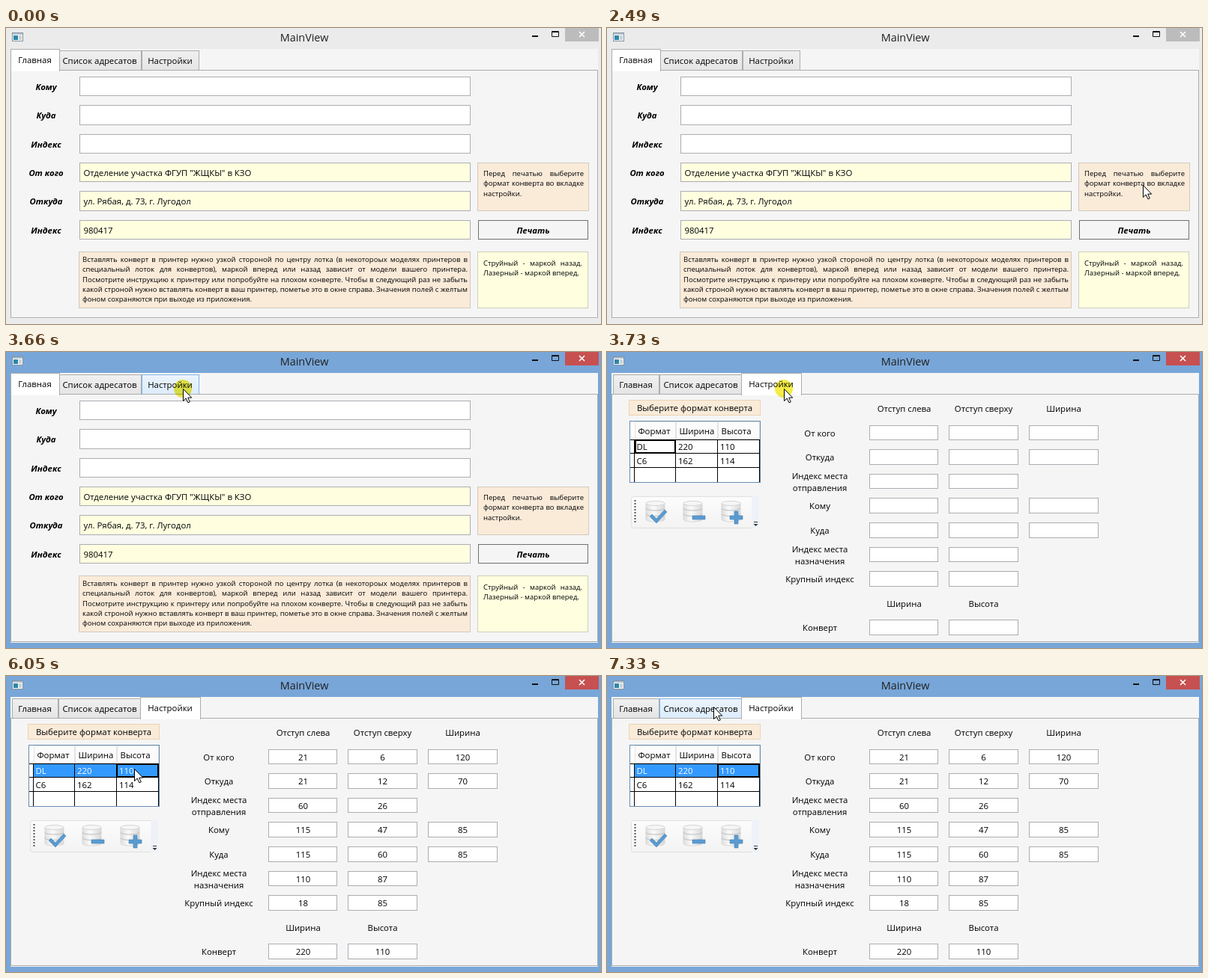
These frames come from a looping animation (794 by 396 pixels, 8 s). An HTML page:

```html
<!DOCTYPE html>
<html lang="ru">
<head>
<meta charset="utf-8">
<style>
html, body { margin: 0; width: 100%; height: 100%; overflow: hidden; }
svg { display: block; width: 794px; height: 396px; }
text { font: 11.4px "Open Sans", "Noto Sans", sans-serif; fill: #000; }
.title { font-size: 14.4px; fill: #222; }
.label { font-weight: 700; font-style: italic; font-size: 11.3px; }
.small { font-size: 9.5px; }
.mid { text-anchor: middle; }
.bar { fill: #ebebeb; }
.close { fill: #bcbcbc; }
.active .bar { fill: #78a6d8; }
.active .close { fill: #c75050; }
.field.hover { stroke: #7eb4ea; }
.tab.hover { fill: url(#tabHover); stroke: #7eb4ea; }
.header.hover { fill: url(#headerHover); stroke: #8fd0ee; }
.picked { fill: #39f; }
#halo { fill: #f5ec45; mix-blend-mode: multiply; }
.values, .picked, .after { display: none; }
.loaded .values, .loaded .picked, .loaded .after { display: inline; }
.loaded .before { display: none; }
.loaded .first { fill: #fff; }
</style>
</head>
<body>
<svg id="stage" viewBox="0 0 794 396"></svg>
<script>
const LOOP = 8000;
const BORDER = '#abadb3', YELLOW = '#ffffe0', PEACH = '#faebd9';
const stage = document.getElementById('stage');

const box = (x, y, w, h, fill, stroke, extra = '') =>
  `<rect x="${x + .5}" y="${y + .5}" width="${w - 1}" height="${h - 1}" fill="${fill}" stroke="${stroke}" ${extra}/>`;
const fill = (x, y, w, h, color, extra = '') =>
  `<rect x="${x}" y="${y}" width="${w}" height="${h}" fill="${color}" ${extra}/>`;
const text = (x, y, s, cls = '') => `<text x="${x}" y="${y}" class="${cls}">${s}</text>`;
const mid = (x, y, s, cls = '') => text(x, y, s, 'mid ' + cls);
const gradient = (id, from, to) =>
  `<linearGradient id="${id}" x2="0" y2="1"><stop stop-color="${from}"/><stop offset="1" stop-color="${to}"/></linearGradient>`;

// Input whose top and bottom edges snap to whole pixels.
const input = (x, y, w, h, color, extra) => {
  const top = Math.round(y);
  return box(x, top, w, Math.round(y + h) - top, color, BORDER, extra);
};

// Lines are justified after insertion; the last one stays ragged.
const paragraph = (x, y, width, lines) => lines.map((line, i) =>
  `<text x="${x}" y="${y + i * 13.35}" class="small" ${i < lines.length - 1 ? `data-width="${width}"` : ''}>${line}</text>`
).join('');

const tab = (x, w, center, label) =>
  box(x, 30, w, 27, 'url(#tab)', '#acacac', 'class="tab"') + mid(center, 48, label);
const selectedTab = (x, w, center, label) => fill(6, 56, 784, 1, '#acacac') +
  box(x, 28, w, 30, '#fff', '#acacac') + fill(x + 1, 56, w - 2, 2, '#fff') + mid(center, 47, label);

function windowFrame() {
  return fill(0, 0, 794, 396, '', 'class="bar"') +
    box(8, 6, 15, 12, '#f4f8fa', '#8494a0') + fill(9, 7, 13, 2, '#b9c6cf') +
    fill(10, 10, 6, 6, '#2f86a8') + fill(17, 10, 4, 6, '#c8d3d8') +
    mid(398, 18, 'MainView', 'title') +
    fill(702, 10, 8, 2, '#111') +
    '<path d="M728.5 4.5h9v7h-9zM728 5.5h10" fill="none" stroke="#111"/>' +
    fill(746, 0, 45, 18, '', 'class="close"') +
    '<path d="M765 5l7 7m0-7l-7 7" stroke="#fff" stroke-width="1.6"/>' +
    fill(6, 28, 784, 361, '#f5f5f5') +
    box(6, 56, 784, 332, '#f5f5f5', '#acacac');
}

function mainPage() {
  const rows = [['Кому'], ['Куда'], ['Индекс'],
    ['От кого', 'Отделение участка ФГУП "ЖЩКЫ" в КЗО'],
    ['Откуда', 'ул. Рябая, д. 73, г. Лугодол'], ['Индекс', '980417']];
  const fields = rows.map(([label, value], i) => {
    const y = 65 + i * 115 / 3, baseline = Math.round(y + 18);
    return mid(53.5, baseline, label, 'label') +
      input(98, y, 522, 26.3, value ? YELLOW : '#fff', 'class="field"') +
      text(103.5, baseline, value || '');
  }).join('');
  return tab(71, 110, 125, 'Список адресатов') + tab(181, 77, 219, 'Настройки') +
    selectedTab(6, 66, 38.5, 'Главная') + fields +
    box(629, 180, 149, 65, PEACH, '#d3c9bd') +
    paragraph(637, 198, 134, ['Перед печатью выберите', 'формат конверта во вкладке', 'настройки.']) +
    box(630, 257, 147, 26, '#f5f5f5', '#707070') + mid(703.5, 275, 'Печать', 'label') +
    box(97, 299, 523, 76, PEACH, '#d3c9bd') +
    paragraph(102, 313, 514, [
      'Вставлять конверт в принтер нужно узкой стороной по центру лотка (в некотороых моделях принтеров в',
      'специальный лоток для конвертов), маркой вперед или назад зависит от модели вашего принтера.',
      'Посмотрите инструкцию к принтеру или попробуйте на плохом конверте. Чтобы в следующий раз не забыть',
      'какой строной нужно вставлять конверт в ваш принтер, пометье это в окне справа. Значения полей с желтым',
      'фоном сохраняются при выходе из приложения.']) +
    box(629, 299, 148, 76, YELLOW, '#cfcfb8') +
    paragraph(637, 318, 132, ['Струйный - маркой назад.', 'Лазерный - маркой вперед.']);
}

function formatGrid() {
  const columns = [[37, 55, 'Формат'], [92, 56, 'Ширина'], [148, 56, 'Высота']];
  const cells = [['DL', 220, 110], ['C6', 162, 114]];
  return box(30, 92, 175, 83, '#fff', '#688caf') +
    columns.map(([x, w, name]) =>
      box(x, 93, w, 24, '#fbfbfb', '#e2e3e5', 'class="header"') + text(x + 4.5, 110, name)).join('') +
    fill(37, 117, 167, 18, '', 'class="picked"') +
    '<path d="M31 117.5h173M31 135.5h173M31 154.5h173M36.5 117v57M91.5 117v57M147.5 117v57M203.5 117v57" stroke="#000"/>' +
    '<path class="before" d="M38 118h53v17h-53z" fill="none" stroke="#000" stroke-width="2"/>' +
    '<path class="after" d="M148 118h55v17h-55z" fill="none" stroke="#000" stroke-width="2"/>' +
    cells.map((row, r) => row.map((value, c) =>
      text([39.5, 95, 151][c], 131 + r * 19, value, r ? '' : 'first')).join('')).join('');
}

function toolbar() {
  const cylinder = x => `<g transform="translate(${x} 199)">` +
    '<path d="M0 3v22c0 4 25 4 25 0V3" fill="url(#disk)" stroke="#d8d8d8"/>' +
    '<path d="M0 10c0 4 25 4 25 0M0 17.500c0 4 25 4 25 0" fill="none" stroke="#bdbdbd"/>' +
    '<ellipse cx="12.5" cy="3.5" rx="12.5" ry="3" fill="#f6f6f6" stroke="#d4d4d4"/></g>';
  const badge = d => `<path d="${d}" fill="#5a9bd0" stroke="#4585bb" stroke-width=".6"/>`;
  return box(32, 193, 171, 43, 'url(#toolbar)', '#e3dfdb', 'rx="3"') + fill(193, 193, 10, 43, '#eef2f8') +
    '<path d="M37.5 198v31" stroke="#555" stroke-width="2" stroke-dasharray="2 2"/>' +
    [52, 102, 153].map(cylinder).join('') +
    badge('M57 220l3-3 6 6 11-12 3 3-14 15z') + badge('M114 219h17v5h-17z') +
    badge('M170 213h5v6h6v5h-6v6h-5v-6h-6v-5h6z') +
    '<path d="M196 227.5h5" stroke="#333"/><path d="M195.500 230h6l-3 3z" fill="#333"/>';
}

function settingsPage() {
  const columns = [350, 456, 563];
  const rows = [
    [0, ['От кого'], [21, 6, 120]],
    [1, ['Откуда'], [21, 12, 70]],
    [2, ['Индекс места', 'отправления'], [60, 26]],
    [3, ['Кому'], [115, 47, 85]],
    [4, ['Куда'], [115, 60, 85]],
    [5, ['Индекс места', 'назначения'], [110, 87]],
    [6, ['Крупный индекс'], [18, 85]],
    [8, ['Конверт'], [220, 110]]];
  const form = rows.map(([slot, label, values]) => {
    const y = 97.75 + slot * 32.55, top = Math.round(y);
    return label.map((line, i) => mid(284, top + (label.length > 1 ? 7 : 15) + i * 16, line)).join('') +
      values.map((value, c) => input(columns[c], y, c ? 93 : 92, 20.6, '#fff') +
        mid(columns[c] + 46.5, top + 15, value, 'values')).join('');
  }).join('');
  return tab(8, 62, 38.5, 'Главная') + tab(70, 110, 125, 'Список адресатов') +
    selectedTab(179, 81, 219, 'Настройки') +
    box(29, 64, 176, 21, PEACH, '#ead3b2') + mid(117, 79, 'Выберите формат конверта') +
    formatGrid() + toolbar() +
    mid(396.5, 80, 'Отступ слева') + mid(502.5, 80, 'Отступ сверху') + mid(609.5, 80, 'Ширина') +
    mid(396.5, 341, 'Ширина') + mid(502.5, 341, 'Высота') + form;
}

stage.innerHTML = '<defs>' + gradient('tab', '#f0f0f0', '#e5e5e5') + gradient('tabHover', '#ecf4fc', '#dcecfc') +
  gradient('headerHover', '#e3f7ff', '#a9dff8') + gradient('toolbar', '#fcfcfc', '#f3f3f3') +
  '<linearGradient id="disk"><stop stop-color="#dedede"/><stop offset=".4" stop-color="#fafafa"/><stop offset="1" stop-color="#d8d8d8"/></linearGradient></defs>' +
  windowFrame() + `<g id="main">${mainPage()}</g><g id="settings">${settingsPage()}</g>` +
  '<circle id="halo" r="12"/>' +
  '<path id="arrow" d="M.5.5v16l3.700-3.500 2.700 5.800 2.400-1-2.600-5.700h5z" fill="#fff" stroke="#000"/>' +
  '<path id="beam" d="M-3.500-6.500h2.500l1 1 1-1h2.500M0-6v13M-3.500 7.500h2.500l1-1 1 1h2.500" fill="none" stroke="#000" stroke-width="1.300"/>' +
  '<path id="resize" d="M777 385h7l-2.500 2.500 7 7 2.500-2.500v7h-7l2.500-2.500-7-7-2.500 2.500z" fill="#fff" stroke="#000"/>';

for (const line of stage.querySelectorAll('[data-width]')) {
  const gaps = line.textContent.split(' ').length - 1;
  line.style.wordSpacing = (line.dataset.width - line.getComputedTextLength()) / gaps + 'px';
}

const part = Object.fromEntries([...stage.querySelectorAll('[id]')].map(el => [el.id, el]));
const hoverables = [...stage.querySelectorAll('.field, .tab, .header')].map(el => ({
  el, page: el.parentNode.id, x: +el.getAttribute('x'), y: +el.getAttribute('y'),
  w: +el.getAttribute('width'), h: +el.getAttribute('height') + 1
}));

// Each move: start, end, number of steps.
const moves = [[1010, 1630, 10], [2480, 3250, 12], [3330, 3470, 3], [4260, 4980, 11], [6050, 6660, 10], [6860, 7330, 8]];
// Pointer path: time, x, y.
const path = [
  [1010, 786, 249], [1150, 769, 226], [1350, 740, 211], [1630, 727, 217],
  [2420, 727, 217], [2560, 700, 200], [2830, 528, 100], [2900, 462, 82], [3250, 274, 58], [3470, 236, 49],
  [4190, 236, 49], [4450, 212, 86], [4600, 181, 117], [4700, 181, 117], [4980, 170, 124],
  [5980, 170, 124], [6050, 171, 124], [6350, 208, 84], [6660, 248, 45],
  [6790, 248, 45], [7330, 142, 41]];

function pointerAt(t) {
  const [start, end, steps] = moves.filter(m => m[0] <= t).pop() || moves[0];
  const dt = (end - start) / (steps - 1);
  const time = Math.min(end, start + Math.floor((t - start) / dt + 1e-6) * dt);
  const next = path.findIndex(p => p[0] >= time - 1e-6);
  if (next < 1) return path[0].slice(1);
  const a = path[next - 1], b = path[next];
  const u = (time - a[0]) / (b[0] - a[0]);
  return [a[1] + (b[1] - a[1]) * u, a[2] + (b[2] - a[2]) * u].map(Math.round);
}

const show = (el, on) => el.style.display = on ? '' : 'none';

function render(t) {
  const page = t < 3730 ? 'main' : 'settings';
  const visible = t >= 1010;
  const [x, y] = pointerAt(t);
  let typing = false;

  for (const h of hoverables) {
    const on = visible && h.page === page && x >= h.x && x <= h.x + h.w && y >= h.y && y <= h.y + h.h;
    h.el.classList.toggle('hover', on);
    typing ||= on && h.el.classList.contains('field');
  }
  stage.classList.toggle('active', t >= 3660);
  stage.classList.toggle('loaded', t >= 4980);
  show(part.main, page === 'main');
  show(part.settings, page === 'settings');
  show(part.resize, t >= 740 && t < 810);
  show(part.halo, t >= 3660 && t < 3800 || t >= 4980 && t < 5110);
  show(part.arrow, visible && !typing);
  show(part.beam, visible && typing);
  for (const el of [part.halo, part.arrow, part.beam]) el.setAttribute('transform', `translate(${x} ${y})`);
}

const begin = performance.now();
function tick() {
  render((performance.now() - begin) % LOOP);
  requestAnimationFrame(tick);
}
tick();
</script>
</body>
</html>
```
